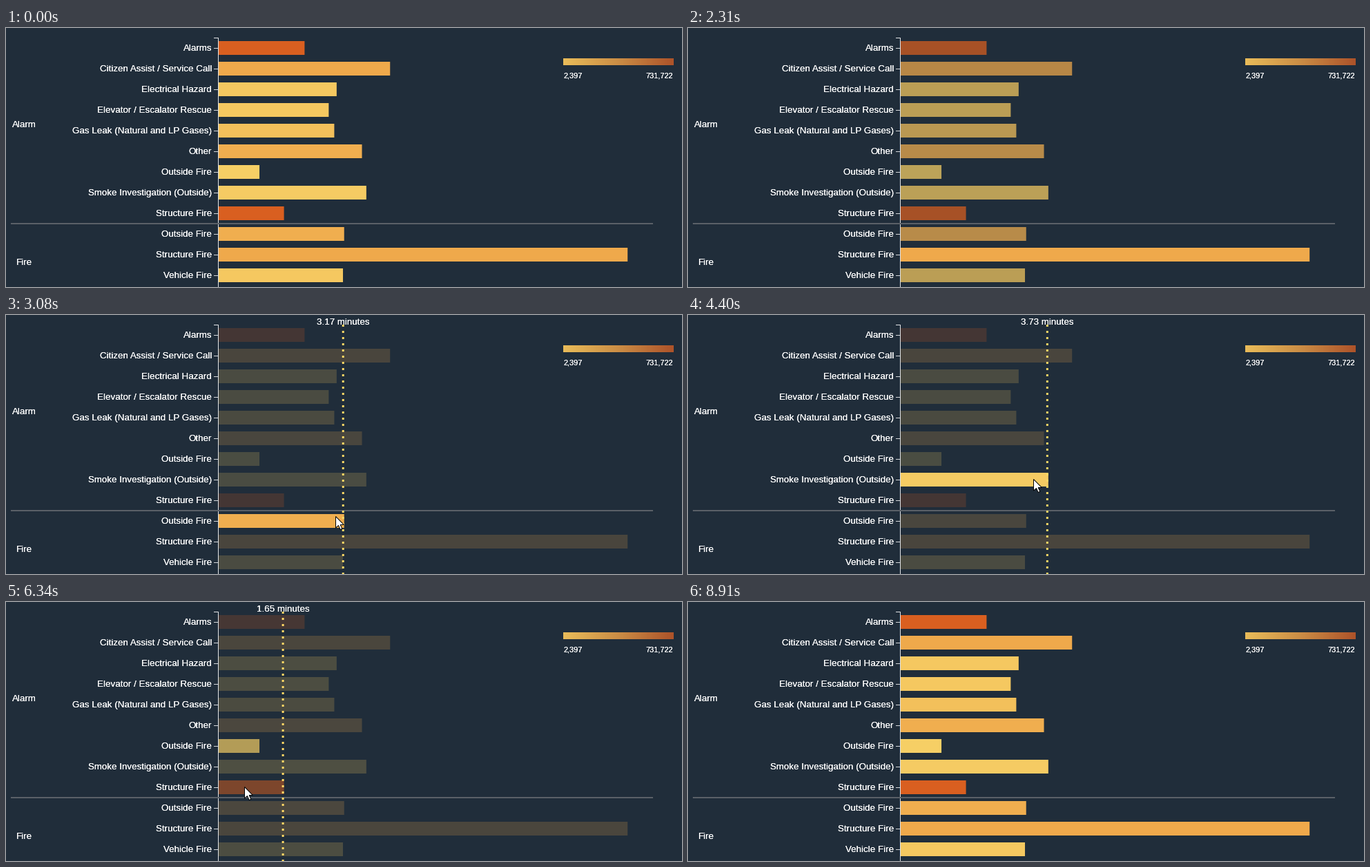
These frames come from a looping animation (979 px wide and 376 px high, 9770 ms). A matplotlib script:

```python
import numpy as np
import matplotlib.pyplot as plt
from matplotlib.animation import FuncAnimation
from matplotlib.colors import LinearSegmentedColormap
from matplotlib.patches import Polygon, Rectangle

W, H, DPI = 979, 376, 64
LOOP_MS, FRAMES = 9770, 350
FRAME_MS = LOOP_MS / FRAMES
PT = 72 / DPI  # points per pixel

BG, INK, LIMIT = "#202d3a", "white", "#fed966"
AXIS_X, TOP, ROW, PAD = 308, 14, 30, 5
MINUTE_PX = 57.33
FADE_MS, DIM, STEP_MS, SETTLE_MS = 250, 0.2, 76, 100

ramp = LinearSegmentedColormap.from_list(
    "calls", ["#f6cf65", "#efa94b", "#d95f20"])
legend_ramp = LinearSegmentedColormap.from_list(
    "legend", ["#e9bc59", "#cb8d45", "#ad532a"])

# Name, minutes, position on the colour ramp
BARS = [
    ("Alarms", 2.17, 1),
    ("Citizen Assist / Service Call", 4.33, 0.5),
    ("Electrical Hazard", 2.98, 0.1),
    ("Elevator / Escalator Rescue", 2.78, 0.1),
    ("Gas Leak (Natural and LP Gases)", 2.92, 0.2),
    ("Other", 3.62, 0.43),
    ("Outside Fire", 1.03, 0),
    ("Smoke Investigation (Outside)", 3.73, 0.05),
    ("Structure Fire", 1.65, 1),
    ("Outside Fire", 3.17, 0.43),
    ("Structure Fire", 10.33, 0.5),
    ("Vehicle Fire", 3.14, 0.1),
]

# Pointer moves: start ms, end ms, resting place
OFF = (500, 395)
MOVES = [
    (610, 1300, (891, 333)),
    (2160, 2380, OFF),
    (2700, 3080, (477, 292)),
    (4170, 4400, (500, 238)),
    (4950, 5102, (425, 224)),
    (5102, 5330, (337, 212)),
    (6120, 6420, (345, 268)),
    (7210, 7520, (433, 298)),
    (8450, 8910, OFF),
]
ARROW = np.array([(0, 0), (0, 16.5), (4, 13), (6.6, 19), (9.3, 17.8),
                  (6.7, 12), (11.8, 12)]) + 0.5


def bar_end(minutes):
    return AXIS_X + MINUTE_PX * minutes


def ease_out(u):
    return 1 - (1 - u)**4


def ease_in_out(u):
    u = min(max(u, 0), 1)
    return 4 * u**3 if u < 0.5 else 1 - 4 * (1 - u)**3


def pointer_at(t):
    spot = np.array(OFF, float)
    for start, end, goal in MOVES:
        if t > start:
            u = min((t - start) / (end - start), 1)
            spot = spot + (np.array(goal) - spot) * ease_out(u)
    return spot


def bar_under(spot):
    """Index of the bar below the pointer tip, or None."""
    x, y = spot
    row, offset = divmod(y - TOP, ROW)
    inside = y < H and PAD <= offset <= ROW - PAD
    return int(row) if inside and x <= bar_end(BARS[int(row)][1]) else None


def find_hovers():
    """Times at which the pointer enters or leaves a bar."""
    hovers = [(0, None)]
    for t in range(0, LOOP_MS, 2):
        bar = bar_under(pointer_at(t))
        if bar != hovers[-1][1]:
            hovers.append((t, bar))
    return hovers


def stepped(t):
    """Snap time to the latest picture change."""
    now = 0
    for start, end, _ in MOVES:
        if t >= end:
            now = end + SETTLE_MS
        elif t >= start:
            gap = (end - start) / round((end - start) / STEP_MS)
            now = start + int((t - start) / gap) * gap
    return now


HOVERS = find_hovers()


def hover_state(t):
    """Hovered bar and the opacity of every bar at time t."""
    alpha = np.ones(len(BARS))
    hovered = None
    ends = [at for at, _ in HOVERS[1:]] + [LOOP_MS]
    for (at, bar), end in zip(HOVERS, ends):
        if at > t:
            break
        goal = np.full(len(BARS), 1 if bar is None else DIM)
        if bar is not None:
            goal[bar] = 1
        alpha = alpha + (goal - alpha) * ease_in_out((min(t, end) - at) / FADE_MS)
        hovered = bar
    return hovered, alpha


plt.rcParams["font.family"] = "Liberation Sans"
fig = plt.figure(figsize=(W / DPI, H / DPI), dpi=DPI, facecolor=BG)
ax = fig.add_axes([0, 0, 1, 1])


def label(x, y, text, ha, px=13.33):
    """Text laid twice over itself, for a firmer weight."""
    return [ax.text(x, y, text, ha=ha, va="baseline", size=px * PT,
                    color=INK, zorder=3) for _ in range(2)]


def stroke(xs, ys, color, px, z=2, **style):
    return ax.plot(xs, ys, color=color, lw=px * PT, zorder=z, snap=False,
                   solid_capstyle="butt", dash_capstyle="butt", **style)[0]


def draw_bar(row, name, minutes, level):
    top = TOP + ROW * row + PAD
    rect = Rectangle((AXIS_X, top), MINUTE_PX * minutes, ROW - 2 * PAD,
                     fc=ramp(float(level)), lw=0, zorder=1, snap=False)
    label(298, top + 14, name, "right")
    stroke([301, 307], [top + 10.5] * 2, "#d5d8db", 1)
    return ax.add_patch(rect)


rects = [draw_bar(row, *bar) for row, bar in enumerate(BARS)]
stroke([301, 307.5, 307.5], [14.5, 14.5, H + 5], "#e2e4e6", 1)
stroke([7, 937], [284, 284], "#5a6067", 2)
label(26.5, 144, "Alarm", "center")
label(26.5, 344, "Fire", "center")

ax.imshow(np.linspace(0, 1, 160)[None, :], cmap=legend_ramp, aspect="auto",
          extent=(807, 967, 54, 44), interpolation="nearest", zorder=1)
label(807, 72, "2,397", "left", 11)
label(966, 72, "731,722", "right", 11)

limit = stroke([0, 0], [TOP, H + 5], LIMIT, 3, z=4, ls=(0, (1, 2)))
readout = label(0, 14, "", "center")
pointer = ax.add_patch(Polygon(ARROW, fc="white", ec="black", lw=PT, zorder=6))

ax.set(xlim=(0, W), ylim=(H, 0))
ax.axis("off")


def draw(frame):
    t = stepped((frame + 1) * FRAME_MS)
    hovered, alpha = hover_state(t)
    for rect, a in zip(rects, alpha):
        rect.set_alpha(a)

    shown = hovered is not None
    limit.set_visible(shown)
    plt.setp(readout, visible=shown)
    if shown:
        minutes = BARS[hovered][1]
        x = bar_end(minutes) - 1.5
        limit.set_xdata([x, x])
        plt.setp(readout, x=x + 0.3, text=f"{minutes:.2f} minutes")

    pointer.set_xy(ARROW + np.round(pointer_at(t)))
    return [*rects, limit, *readout, pointer]


anim = FuncAnimation(fig, draw, frames=FRAMES, interval=FRAME_MS,
                     repeat=True, repeat_delay=0, blit=False)
plt.show()
```
